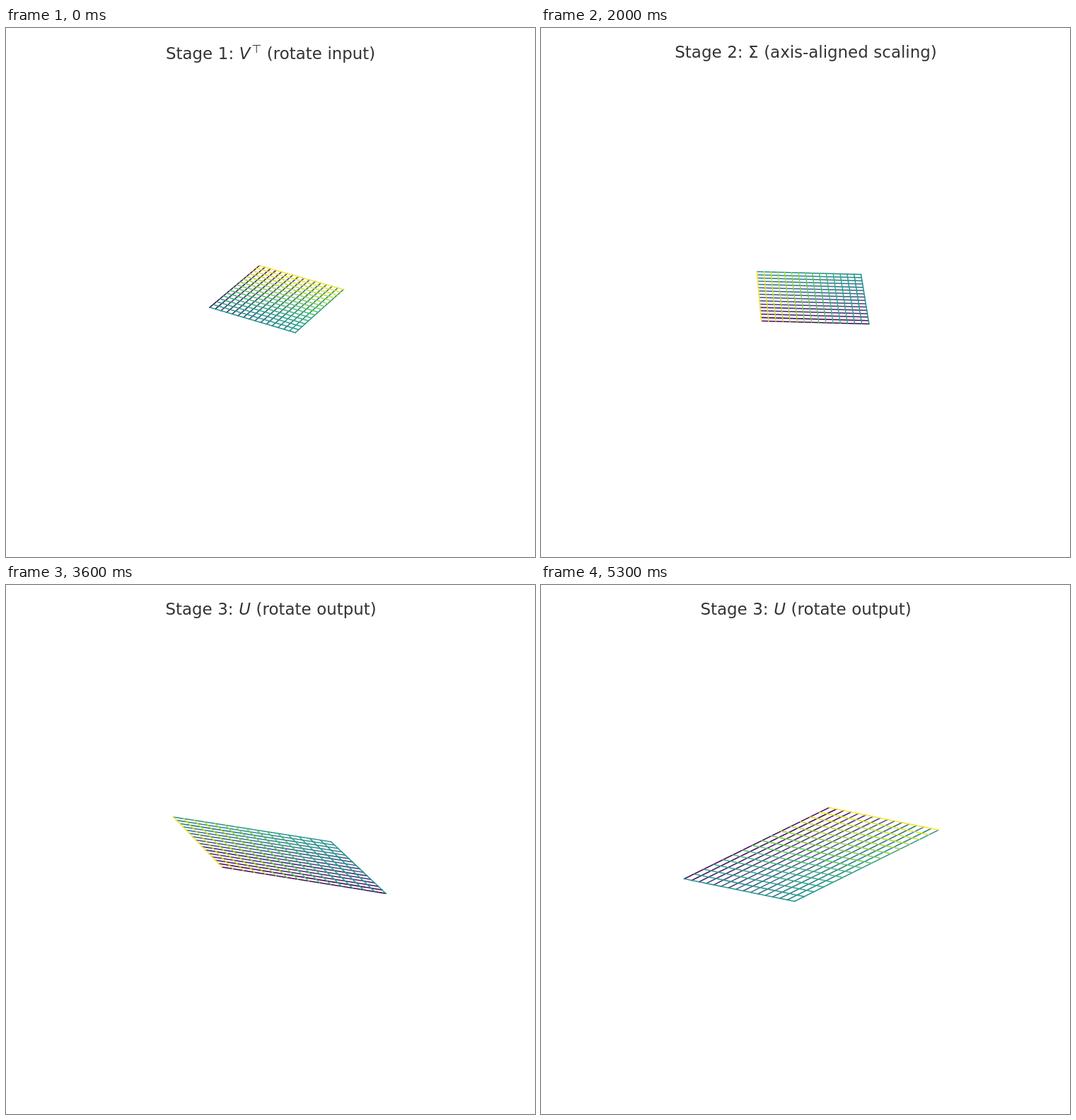
Animation, 748 px wide and 748 px high, one loop 5.4 s. Source, as an HTML page:

```html
<!DOCTYPE html>
<html lang="en">
<head>
<meta charset="utf-8">
<style>
  html, body { margin: 0; height: 100%; overflow: hidden; background: #fff; }
  svg { display: block; width: 748px; height: 748px; }
  line { stroke-width: 1.53; stroke-linecap: square; }
  text { font: 22.92px "DejaVu Sans", sans-serif; fill: #333; word-spacing: .35px; text-anchor: middle; }
  text .start { text-anchor: start; }
  .var { font-style: oblique; }
  .sup { font-size: 16px; }
</style>
</head>
<body>
<svg viewBox="0 0 748 748">
  <g id="grid"></g>
  <g class="title">
    <text x="226" y="44" style="text-anchor:start">Stage 1: <tspan class="var">V</tspan></text>
    <text class="sup" x="354.5" y="35" style="font-size:16px">⊤</text>
    <text x="368.8" y="44" style="text-anchor:start">(rotate input)</text>
  </g>
  <g class="title"><text x="374.5" y="41.5">Stage 2: Σ (axis-aligned scaling)</text></g>
  <g class="title"><text x="374.5" y="41.5">Stage 3: <tspan class="var">U</tspan> (rotate output)</text></g>
</svg>
<script>
const STEP = 100, PER_STAGE = 18, LINES = 16;
const VIRIDIS = ['440154', '472d7b', '3b528b', '2c728e', '21918c', '28ae80', '5ec962', 'addc30', 'fde725']
  .map(hex => [0, 2, 4].map(i => parseInt(hex.substr(i, 2), 16)));

const mix = (a, b, t) => a + (b - a) * t;
const mixAll = (a, b, t) => a.map((row, i) => row.map((v, j) => mix(v, b[i][j], t)));

function viridis(t) {
  const p = t * (VIRIDIS.length - 1), i = Math.min(Math.floor(p), VIRIDIS.length - 2);
  return `rgb(${VIRIDIS[i].map((v, c) => Math.round(mix(v, VIRIDIS[i + 1][c], p - i)))})`;
}

// Singular value decomposition of the 3x2 map A
const A = [[1, 1], [0.5, 1.2], [-0.3, 0.7]];
const dot = (i, j) => A.reduce((sum, row) => sum + row[i] * row[j], 0);
const p = dot(0, 0), q = dot(1, 1), r = dot(0, 1);
const root = Math.hypot(p - q, 2 * r);
const sigma = [Math.sqrt((p + q + root) / 2), Math.sqrt((p + q - root) / 2)];
const angle = Math.atan2(2 * r, p - q) / 2;
const c = Math.cos(angle), s = Math.sin(angle);

const I = [[1, 0], [0, 1], [0, 0]];
const Vt = [[-c, -s], [s, -c], [0, 0]];
const SVt = Vt.map((row, i) => row.map(v => v * (sigma[i] || 0)));
const KEYS = [I, Vt, SVt, A];

// Perspective view, elevation 30, azimuth -60, box 4:4:3
const UNIT = 0.1885, DIST = 10, C = Math.sqrt(3) / 2;
function project(m, x, y, stage) {
  const [X, Y, Z] = m.map(row => (row[0] * x + row[1] * y) * UNIT);
  const z = Z * 0.75;
  const right = C * X + Y / 2;
  const up = -X / 4 + C * Y / 2 + C * z;
  const near = C * X / 2 - 0.75 * Y + z / 2;
  const k = (stage ? 3692 : 3676) / (DIST - near);
  return [383.2 + right * k, (stage ? 380.8 : 382.3) - up * k];
}

const grid = document.getElementById('grid');
const titles = document.querySelectorAll('.title');
const lines = Array.from({ length: 2 * LINES }, (_, i) => {
  const el = document.createElementNS('http://www.w3.org/2000/svg', 'line');
  el.setAttribute('stroke', viridis(i / (2 * LINES - 1)));
  grid.append(el);
  const at = (i % LINES) / (LINES - 1) * 2 - 1;
  return { el, ends: i < LINES ? [[at, -1], [at, 1]] : [[-1, at], [1, at]] };
});

let shown = -1;
function draw(step) {
  const stage = Math.floor(step / PER_STAGE);
  const m = mixAll(KEYS[stage], KEYS[stage + 1], (step % PER_STAGE) / (PER_STAGE - 1));
  titles.forEach((el, i) => { el.style.display = i === stage ? '' : 'none'; });
  for (const { el, ends } of lines) {
    ends.forEach(([x, y], i) => {
      const [px, py] = project(m, x, y, stage);
      el.setAttribute('x' + (i + 1), px.toFixed(2));
      el.setAttribute('y' + (i + 1), py.toFixed(2));
    });
  }
}

const start = performance.now();
function tick() {
  const step = Math.floor((performance.now() - start) / STEP) % (3 * PER_STAGE);
  if (step !== shown) draw(shown = step);
  requestAnimationFrame(tick);
}
tick();
</script>
</body>
</html>
```
